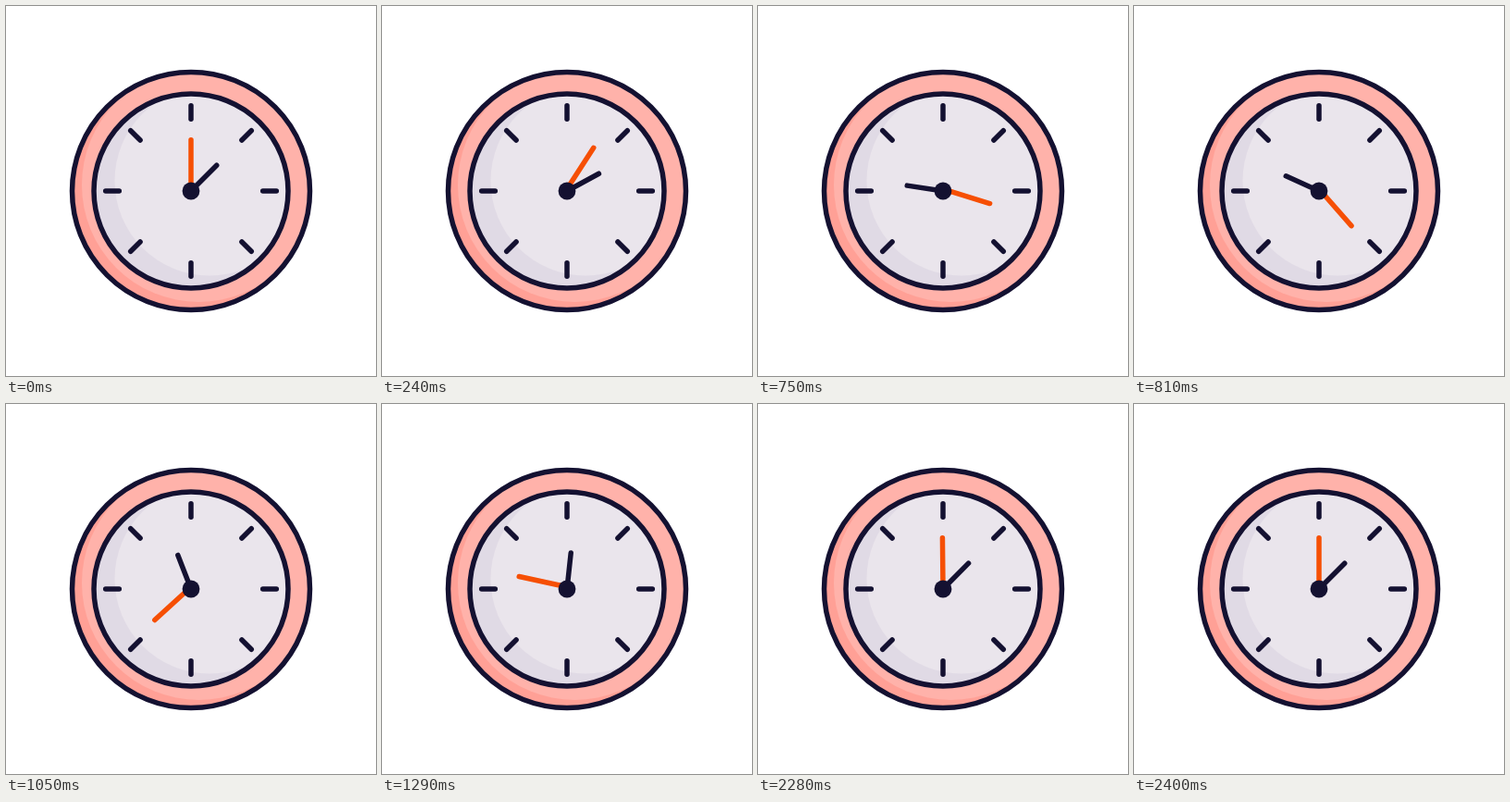
Recreate the animation shown at these times as an HTML page. Size 400 by 400 pixels, loop 4.46 s.

```html
<!DOCTYPE html>
<html lang="en">
<head>
<meta charset="utf-8">
<title>Clock</title>
<style>
  html, body { margin: 0; width: 100%; height: 100%; overflow: hidden; background: #fff; }
  svg { display: block; width: 100%; height: 100%; }
  .line { fill: none; stroke: #141131; stroke-width: 5.5; stroke-linecap: round; }
  #minute { stroke: #f64f04; }
</style>
</head>
<body>
<svg viewBox="0 0 400 400">
  <clipPath id="rim"><circle cx="200" cy="200" r="128.5"/></clipPath>
  <clipPath id="face"><circle cx="200" cy="200" r="105"/></clipPath>
  <g clip-path="url(#rim)">
    <rect width="400" height="400" fill="#ffa096"/>
    <circle cx="208.5" cy="193.5" r="126.5" fill="#ffb2aa"/>
  </g>
  <g clip-path="url(#face)">
    <rect width="400" height="400" fill="#e0dae5"/>
    <circle cx="220" cy="189" r="102.5" fill="#eae5ec"/>
  </g>
  <circle class="line" cx="200" cy="200" r="128.5"/>
  <circle class="line" cx="200" cy="200" r="105"/>
  <g id="ticks"></g>
  <path id="minute" class="line" d="M200 197.8V144.8"/>
  <path id="hour" class="line" d="M200 200V160.8"/>
  <circle cx="200" cy="200" r="9.4" fill="#141131"/>
</svg>
<script>
const LOOP = 4460, SPIN = 2400, STEP = 30;
const get = id => document.getElementById(id);

get('ticks').innerHTML = Array.from({ length: 8 }, (_, i) =>
  `<path class="line" d="M200 107.7V122.3" transform="rotate(${i * 45} 200 200)"/>`).join('');

// cubic-bezier(1/3, 0, 0, 1)
function ease(x) {
  let lo = 0, hi = 1;
  for (let i = 0; i < 30; i++) {
    const s = (lo + hi) / 2;
    if (s * (1 - s) ** 2 + s ** 3 < x) lo = s; else hi = s;
  }
  return lo * lo * (3 - 2 * lo);
}

function turn(id, angle, pivotY) {
  get(id).setAttribute('transform', `rotate(${angle} 200 ${pivotY})`);
}

function draw(now) {
  const time = Math.floor(now % LOOP / STEP) * STEP;
  const p = time >= SPIN ? 1 : ease(time / SPIN);
  turn('minute', 720 * p, 197.8);
  turn('hour', 45 + 360 * p, 200);
}

let start;
function tick(now) {
  start ??= now;
  draw(now - start);
  requestAnimationFrame(tick);
}
draw(0);
requestAnimationFrame(tick);
</script>
</body>
</html>
```
